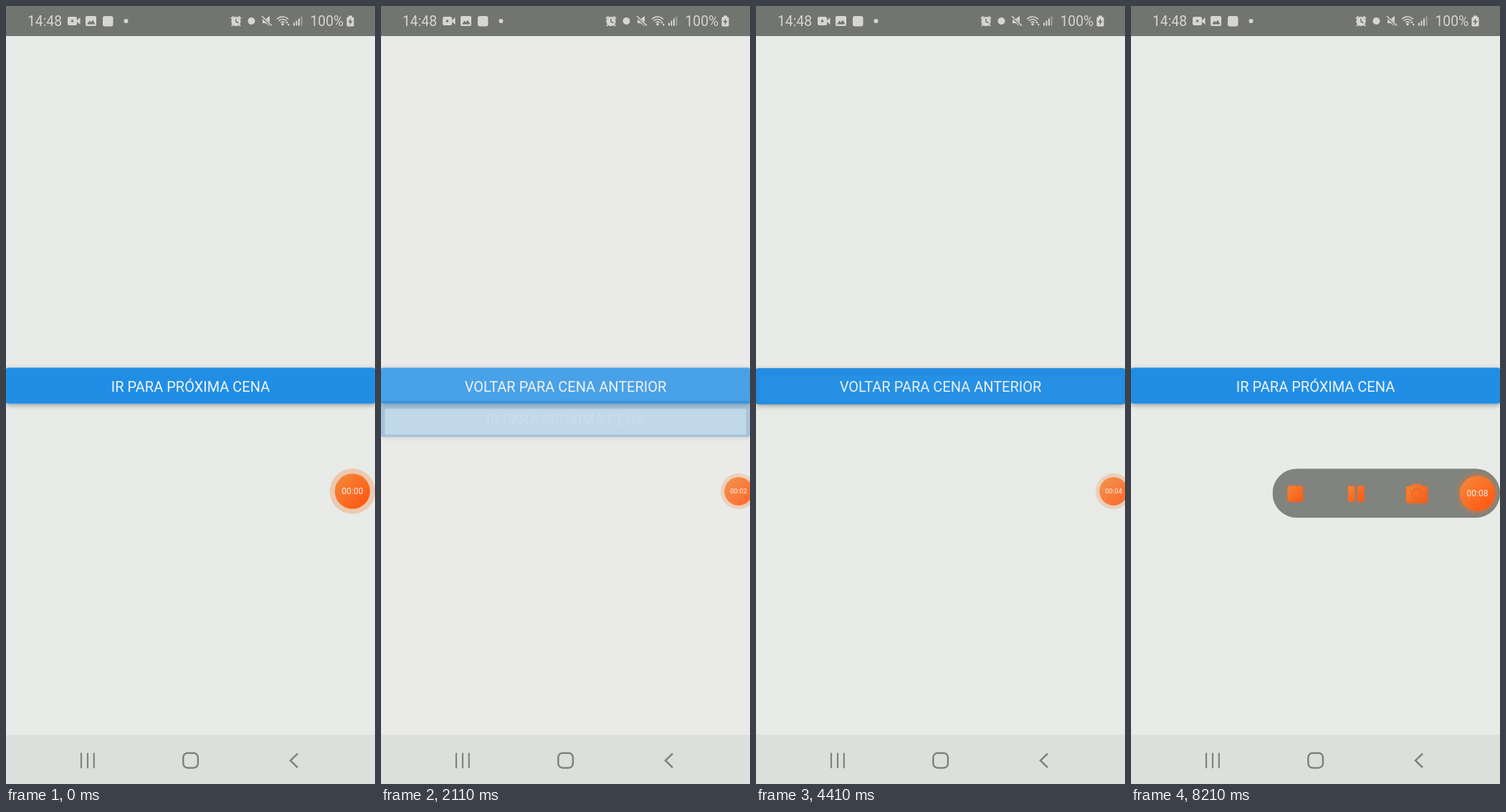
Animation, 515 px wide and 1087 px high, one loop 8.28 s. Source, as an HTML page with a canvas:

```html
<!DOCTYPE html>
<html lang="pt">
<head>
<meta charset="utf-8">
<style>
html, body { margin: 0; width: 100%; height: 100%; overflow: hidden; background: #e9ebe8; }
canvas { display: block; width: 515px; height: 1087px; }
</style>
</head>
<body>
<canvas id="stage" width="515" height="1087"></canvas>
<script>
const ctx = document.getElementById('stage').getContext('2d');
const W = 515, H = 1087, LOOP = 8280;
const BG = '#e9ebe8', BLUE = '#218ee6', ICON = '#d5d6d3', BAR = '#72746f';
const BUTTON = { y: 505.5, h: 50 };
const LABELS = ['IR PARA PRÓXIMA CENA', 'VOLTAR PARA CENA ANTERIOR'];
const PUSHES = [540, 2077, 4200, 5973];
const PRESSES = [110, 1690, 3800, 5600];
const TICKS = [610, 1620, 2720, 3790, 4820, 5910, 7050, 8200];

const clamp = v => Math.min(1, Math.max(0, v));
const mix = (a, b, k) => a + (b - a) * k;
const easeOut = (k, power) => 1 - Math.pow(1 - k, power);
const span = (t, start, length) => clamp((t - start) / length);

function rounded(x, y, w, h, r) {
  ctx.beginPath();
  ctx.roundRect(x, y, w, h, r);
}
function box(x, y, w, h, r, fill) {
  rounded(x, y, w, h, r);
  ctx.fillStyle = fill;
  ctx.fill();
}
function disc(x, y, r, fill) {
  ctx.beginPath();
  ctx.arc(x, y, r, 0, 7);
  ctx.fillStyle = fill;
  ctx.fill();
}
function line(points, width, color) {
  ctx.beginPath();
  points.forEach(([x, y]) => ctx.lineTo(x, y));
  ctx.lineWidth = width;
  ctx.strokeStyle = color;
  ctx.stroke();
}
function shape(points, fill) {
  ctx.beginPath();
  points.forEach(([x, y]) => ctx.lineTo(x, y));
  ctx.fillStyle = fill;
  ctx.fill();
}
function text(value, x, y, size, color, align = 'left') {
  ctx.font = `${size}px Roboto, sans-serif`;
  ctx.textAlign = align;
  ctx.fillStyle = color;
  ctx.fillText(value, x, y);
}
function orange(x, y, r) {
  const g = ctx.createLinearGradient(x - r * .7, y - r * .7, x + r * .7, y + r * .7);
  g.addColorStop(0, '#f58236');
  g.addColorStop(1, '#ff5a14');
  return g;
}

function drawButton(label, alpha) {
  const { y, h } = BUTTON;
  ctx.save();
  ctx.globalAlpha = alpha;
  // Outer elevation shadow only
  ctx.save();
  ctx.beginPath();
  ctx.rect(-20, y - 30, W + 40, h + 60);
  ctx.roundRect(0, y, W, h, 3);
  ctx.clip('evenodd');
  ctx.shadowColor = 'rgba(0,0,0,.36)';
  ctx.shadowBlur = 7;
  ctx.shadowOffsetY = 2;
  box(0, y, W, h, 3, BLUE);
  ctx.restore();
  // Shadow rim that shows through a translucent button
  if (alpha < 1) {
    ctx.beginPath();
    ctx.roundRect(0, y, W, h, 3);
    ctx.rect(5.5, y + 10.5, W - 11, h - 14);
    ctx.fillStyle = 'rgba(32,70,105,.78)';
    ctx.fill('evenodd');
  }
  box(0, y, W, h, 3, BLUE);
  text(label, W / 2, y + 33, 20, '#f0f5f8', 'center');
  ctx.restore();
}

function drawScene(t) {
  ctx.fillStyle = BG;
  ctx.fillRect(0, 0, W, H);
  let current = PUSHES.findLastIndex(start => t >= start);
  const k = current < 0 ? 1 : span(t, PUSHES[current], 350);
  const base = k < 1 ? current : current + 1;
  drawButton(LABELS[base % 2], 1);
  drawRipple(t);
  if (k === 1) return;

  const p = easeOut(k, 5);
  const alpha = p < .5 ? p / 2 : p < .9 ? mix(.25, .7, (p - .5) / .4) : mix(.7, 1, (p - .9) / .1);
  ctx.save();
  ctx.translate(0, 78 * (1 - p));
  ctx.globalAlpha = alpha;
  ctx.fillStyle = BG;
  ctx.fillRect(0, 0, W, H);
  drawButton(LABELS[(current + 1) % 2], alpha);
  ctx.restore();
}

function drawRipple(t) {
  const i = PRESSES.findLastIndex(start => t >= start);
  if (i < 0 || t > PUSHES[i]) return;
  const grow = easeOut(span(t, PRESSES[i], 300), 2);
  const fade = 1 - span(t, PUSHES[i] - 120, 120);
  ctx.save();
  rounded(0, BUTTON.y, W, BUTTON.h, 3);
  ctx.clip();
  disc(258, 535, mix(30, 275, grow), `rgba(0,0,0,${.08 * fade})`);
  ctx.restore();
}

function drawStatusBar() {
  ctx.fillStyle = BAR;
  ctx.fillRect(0, 0, W, 42);
  text('14:48', 30, 28, 19.3, ICON);
  text('100%', 424.5, 28, 19.3, ICON);

  // Camcorder, picture, app badge, dot
  box(86, 15, 13, 12, 2.5, ICON);
  shape([[98, 21], [103.5, 16], [103.5, 26]], ICON);
  disc(92.5, 21, 1.8, BAR);
  box(111, 14, 15, 14, 2, ICON);
  shape([[113, 25.5], [116.5, 20.5], [118.5, 23], [121, 19.5], [124.5, 25.5]], BAR);
  box(135, 14, 14.5, 14.5, 3, ICON);
  disc(167.5, 21, 3, ICON);

  // Alarm clock
  disc(321, 21.5, 6.6, ICON);
  line([[314, 17.5], [317.5, 14.5]], 2, ICON);
  line([[324.5, 14.5], [328, 17.5]], 2, ICON);
  line([[316.5, 26], [315, 28]], 2, ICON);
  line([[325.5, 26], [327, 28]], 2, ICON);
  line([[321, 17.5], [321, 22], [324.5, 23.5]], 1.5, BAR);

  disc(342.5, 21, 5, ICON);

  // Muted speaker
  shape([[358, 18.5], [362, 18.5], [368, 14], [368, 28], [362, 24], [358, 24]], ICON);
  line([[356, 14], [371, 28]], 3.5, BAR);
  line([[357, 14], [371, 27.5]], 1.6, ICON);

  // Wireless arcs with activity arrows
  for (const r of [3.5, 7, 10.5]) {
    ctx.beginPath();
    ctx.arc(386, 25.5, r, -Math.PI * .77, -Math.PI * .23);
    ctx.lineWidth = 1.6;
    ctx.strokeStyle = ICON;
    ctx.stroke();
  }
  disc(386, 25.5, 1.8, ICON);
  shape([[390, 24], [392, 21], [394, 24]], ICON);
  shape([[392.5, 25], [396, 25], [394.2, 28]], ICON);

  // Signal bars
  for (let i = 0; i < 4; i++) {
    const h = 4 + i * 3;
    box(401 + i * 3.5, 27.5 - h, 2, h, 0, i < 3 ? ICON : '#a0a29e');
  }

  // Charging battery
  box(478, 13.5, 5, 3, .5, ICON);
  box(475.5, 15.5, 10, 13, 1.5, ICON);
  shape([[481.5, 17], [477.3, 22.7], [480, 22.7], [479.3, 27], [483.7, 21], [481, 21]], BAR);
}

function drawNavBar() {
  const color = '#80827e';
  ctx.fillStyle = '#dce0dc';
  ctx.fillRect(0, 1018.5, W, H - 1018.5);
  for (const x of [105, 114, 122.8]) line([[x, 1043.5], [x, 1065]], 2.2, color);
  rounded(247.3, 1043.8, 20.6, 20.6, 6);
  ctx.lineWidth = 2.5;
  ctx.stroke();
  line([[407, 1044.5], [397, 1054.2], [407, 1064]], 2.5, color);
}

function drawControls(open) {
  const left = mix(446, 197.5, open);
  ctx.save();
  rounded(left, 646.5, W - left, 68.5, 34);
  ctx.clip();
  ctx.globalAlpha = Math.min(1, open * 3);
  ctx.fillStyle = '#80837e';
  ctx.fillRect(left, 646, W - left, 70);
  ctx.globalAlpha = open;
  ctx.shadowColor = 'rgba(255,100,20,.5)';
  ctx.shadowBlur = 4;
  box(218.5, 670.5, 21.5, 22, 3, orange(229, 681, 15));
  box(303, 670.5, 9.3, 22, 2, orange(314, 681, 15));
  box(316, 670.5, 9.3, 22, 2, orange(314, 681, 15));
  box(392, 668, 13.5, 8, 2, orange(399, 681, 17));
  box(384, 671, 29.5, 23.5, 3, orange(399, 681, 17));
  ctx.shadowBlur = 0;
  ctx.beginPath();
  ctx.arc(399, 682, 7, 0, 7);
  ctx.lineWidth = 1.6;
  ctx.strokeStyle = '#d46a35';
  ctx.stroke();
  ctx.restore();
}

function drawRecorder(t) {
  const wake = easeOut(span(t, 6650, 180), 2);
  const small = easeOut(span(t, 1620, 230), 2) * (1 - wake);
  const open = easeOut(span(t, 6860, 320), 3);
  const x = mix(483.5, 499, small), y = mix(678, 681, open);
  const r = mix(24.5, 19.7, small);
  if (open > 0) drawControls(open);

  ctx.save();
  ctx.globalAlpha = mix(1, .78, small);
  disc(x, y, mix(31.7, 25, small), `rgba(240,130,60,${.32 * (1 - open)})`);
  ctx.shadowColor = `rgba(255,110,30,${mix(.35, .9, open)})`;
  ctx.shadowBlur = mix(2, 9, open);
  disc(x, y, r, orange(x, y, r));
  ctx.restore();

  const seconds = TICKS.filter(tick => t >= tick).length;
  const size = mix(12, 9.5, small);
  text('00:0' + seconds, x, y + size * .36, size, '#fff1e8', 'center');
}

function frame(now) {
  const t = now % LOOP;
  drawScene(t);
  drawStatusBar();
  drawNavBar();
  drawRecorder(t);
  requestAnimationFrame(time => frame(time - origin));
}
const origin = performance.now();
frame(0);
</script>
</body>
</html>
```
